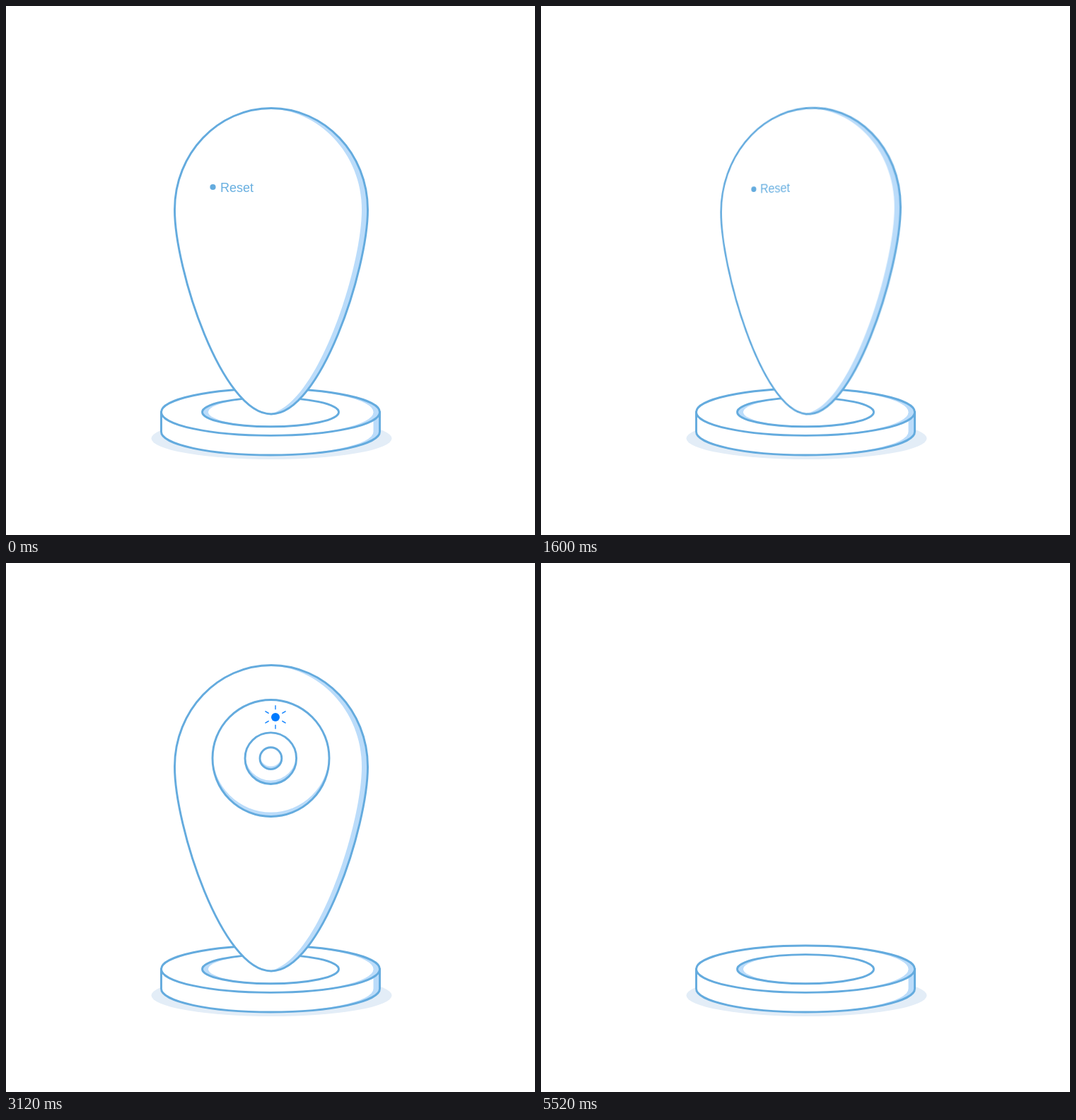
These frames come from a looping animation (748 by 748 pixels, 5.6 s). An HTML page:

```html
<!DOCTYPE html>
<html lang="en">
<head>
<meta charset="utf-8">
<title>Camera reset</title>
<style>
  html, body { margin: 0; width: 100%; height: 100%; overflow: hidden; background: #fff; }
  #stage { position: fixed; inset: 0; overflow: hidden; contain: strict; }
  svg { position: absolute; left: 0; top: 0; width: 748px; height: 748px; transform-origin: 375px 360px; }
  .card { backface-visibility: hidden; }
  .line { fill: none; stroke: #64abde; stroke-width: 2.9; stroke-linejoin: round; }
  .shade { fill: #bbdcfa; }
  .white { fill: #fff; }
  .needle { stroke-width: 3.6; stroke-linecap: round; }
  text { font: 18px "Liberation Sans", Arial, sans-serif; fill: #68afe0; }
</style>
</head>
<body>
<div id="stage"></div>
<script>
const LOOP = 5600, STEP = 80;
const stage = document.getElementById('stage');

let clips = 0;
// Outlined white shape with a crescent of shade left by a shifted copy
function shaded(shape, dx, dy) {
  const id = 'clip' + clips++;
  const draw = attrs => shape.replace('/>', ` ${attrs}/>`);
  return `<clipPath id="${id}">${shape}</clipPath>
    <g clip-path="url(#${id})">${draw('class="shade"')}
    ${draw(`class="white" transform="translate(${dx} ${dy})"`)}</g>${draw('class="line"')}`;
}

const ellipse = (x, y, rx, ry = rx) => `<ellipse cx="${x}" cy="${y}" rx="${rx}" ry="${ry}"/>`;

const egg = () => shaded(`<path d="M375 144.5C450.4 144.5 511.5 208.7 511.5 288
  C511.5 372 445 577 375 577C305 577 238.5 372 238.5 288
  C238.5 208.7 299.6 144.5 375 144.5Z"/>`, -8.5, 0);

// Horizontal capsule outline around the origin
const capsule = r => `M-40 ${-r}H40A${r} ${r} 0 0 1 40 ${r}H-40A${r} ${r} 0 0 1 -40 ${-r}Z`;

function layer(content, className = '') {
  const svg = document.createElementNS('http://www.w3.org/2000/svg', 'svg');
  svg.setAttribute('class', className);
  svg.innerHTML = content;
  stage.append(svg);
  return svg;
}

const rays = [30, 90, 150, 210, 270, 330].map(angle =>
  `<path d="M10.8 0H16.8" transform="rotate(${angle})"/>`).join('');

// Base
layer(`<ellipse cx="375.5" cy="611.5" rx="170" ry="29.5" fill="#e3edf7"/>
  ${shaded('<path d="M219.5 574V602A154.5 33 0 0 0 528.5 602V574Z"/>', -9, 0)}
  ${shaded(ellipse(374, 574.2, 154.5, 33.2), -9, 0)}
  ${shaded(ellipse(374, 574.2, 96.5, 20.6), 8.5, 0)}`);

const back = layer(`${egg()}<circle cx="292.5" cy="256" r="4.1" fill="#64abde"/>
  <text x="303" y="262.5">Reset</text>`, 'card');

const front = layer(`${egg()}
  ${shaded(ellipse(374.5, 276, 82.5), 0, -6)}
  ${shaded(ellipse(374.3, 276.2, 36.3), 0, -5)}
  ${shaded(ellipse(374.4, 276.2, 15.4), 0, -4)}
  <g transform="translate(381 217.9)"><circle id="led" r="6"/>
  <g id="rays" stroke="#007bff" stroke-width="1.3">${rays}</g></g>`, 'card');

const pin = layer(`<g transform="translate(201.5 286.2) rotate(-20.6)">
  <path class="white" fill-rule="evenodd" d="${capsule(21)}${capsule(14)}"/>
  <path class="line" d="${capsule(21)}"/><path class="line" d="${capsule(14)}"/></g>
  <path class="line needle" d="M259.5 264.8L281.5 256.5"/>`);

const animations = [];
function animate(target, keyframes, delay, end, options) {
  const animation = target.animate(keyframes, { delay, duration: end - delay, fill: 'both', ...options });
  animation.pause();
  animations.push(animation);
}

const away = { transform: 'translateX(-48px)', opacity: 0 };
const inserted = { transform: 'translateX(6px)', opacity: 1 };
animate(pin, [away, inserted], 80, 400, { easing: 'ease-in-out' });
animate(pin, [inserted, away], 1120, 1440, { easing: 'ease-in-out', fill: 'forwards' });

const turned = angle => ({ transform: `perspective(1000px) rotateY(${angle}deg)` });
const flip = { easing: 'cubic-bezier(.5, 0, .88, 1)' };
animate(back, [turned(0), turned(-180)], 1180, 2540, flip);
animate(front, [turned(180), turned(0)], 1180, 2540, flip);
animate(front, { opacity: [1, 0] }, 5200, 5520);

animate(document.getElementById('led'), { fill: ['#000', '#007bff'] }, 2160, 2320);
animate(document.getElementById('rays'), { opacity: [0, 1] }, 2640, 3120,
  { easing: 'ease-in-out', direction: 'alternate', iterations: Infinity });

const start = performance.now();
function tick() {
  const time = (performance.now() - start) % LOOP;
  const shown = Math.floor(time / STEP) * STEP;
  for (const animation of animations) animation.currentTime = shown;
  requestAnimationFrame(tick);
}
tick();
</script>
</body>
</html>
```
